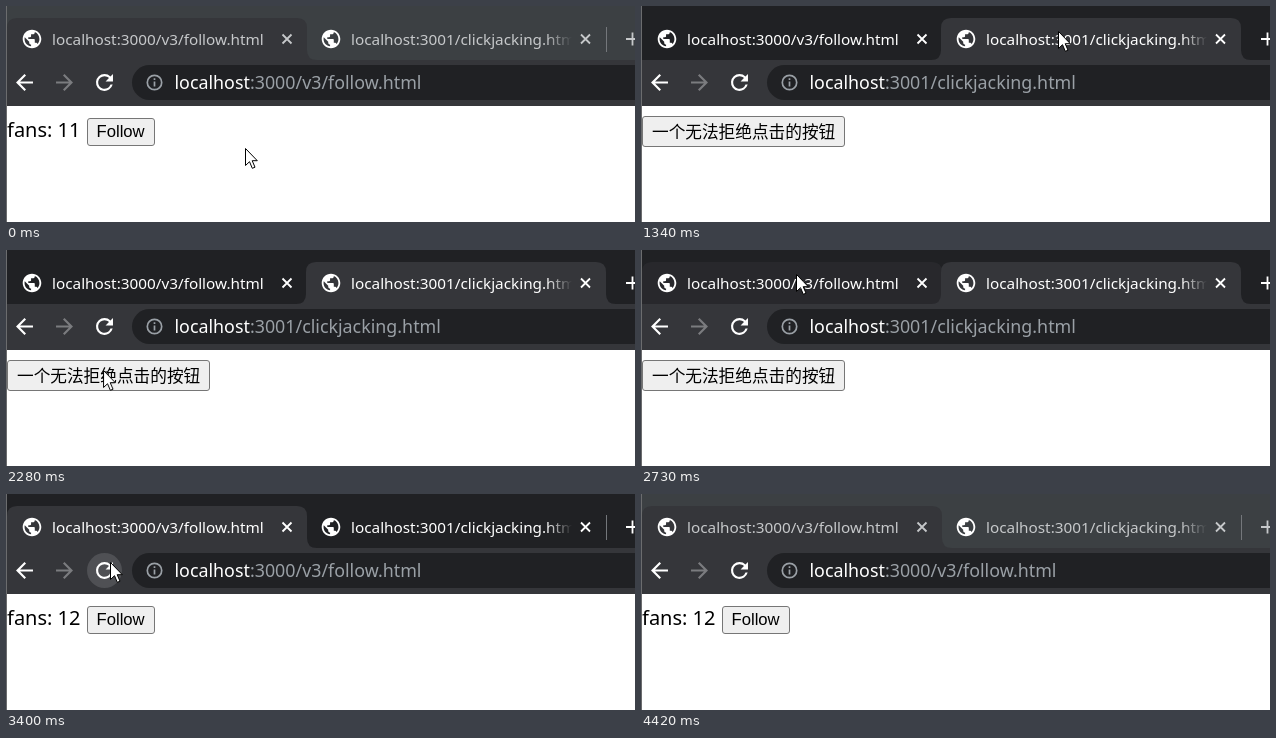
An HTML page for the animation above (4470 ms loop, 629 px wide and 216 px high).

```html
<!DOCTYPE html>
<html lang="zh">
<head>
<meta charset="utf-8">
<title>Clickjacking demo</title>
<style>
html, body { margin: 0; width: 100%; height: 100%; overflow: hidden; background: #fff; }
svg { display: block; width: 629px; height: 216px; }
text { font-family: "Noto Sans", "Open Sans", sans-serif; white-space: pre; }
.anim { animation: 4470ms infinite step-end; }

.tab-text { font-size: 15.3px; fill: currentColor; }
.url { font-size: 17.85px; fill: #9aa0a6; }
.host { fill: #fff; }
.fans { font-size: 20px; }
.button { fill: #efefef; stroke: #767676; }
.follow { font: 16.67px "Liberation Sans", Arial, sans-serif; }
.bait { font: 16.67px "Noto Sans CJK SC", "Noto Sans CJK", sans-serif; }
.line { fill: none; stroke: currentColor; stroke-width: 1.8; }

.chrome { animation-name: ink; }
.strip { animation-name: strip; }
.first { animation-name: first; }
.second { animation-name: second; }
.before { animation-name: before; }
.after { animation-name: after; }
.divider { animation-name: divider; }
.reload-hover { animation-name: reload-hover; }
.hover-1 { animation-name: hover-1; animation-timing-function: linear; }
.hover-2 { animation-name: hover-2; animation-timing-function: linear; }
.cursor { animation-name: cursor; animation-timing-function: linear; }

/* window focus */
@keyframes ink { 0%, 98.85% { color: #c6c8ca; } 29.95%, 100% { color: #fff; } }
@keyframes strip { 0%, 98.85% { fill: #3c4043; } 29.95%, 100% { fill: #202124; } }

/* selected tab */
@keyframes first { 0%, 63.05% { opacity: 1; } 29.95%, 63% { opacity: 0; } 100% { opacity: 1; } }
@keyframes second { 0%, 63.05% { opacity: 0; } 29.95%, 63% { opacity: 1; } 100% { opacity: 0; } }

/* fan counter */
@keyframes before { 0% { opacity: 1; } 75.9%, 100% { opacity: 0; } }
@keyframes after { 0% { opacity: 0; } 75.9%, 100% { opacity: 1; } }

@keyframes divider { 0%, 63.05% { opacity: 1; } 17%, 63% { opacity: 0; } 100% { opacity: 1; } }
@keyframes reload-hover { 0%, 87.2% { opacity: 0; } 69.1% { opacity: 1; } 100% { opacity: 0; } }
@keyframes hover-1 {
  0%, 57.5% { opacity: 0; }
  61%, 63% { opacity: .4; }
  63.05%, 100% { opacity: 0; }
}
@keyframes hover-2 {
  0%, 16.8% { opacity: 0; }
  19.2%, 29.9% { opacity: .7; }
  29.95%, 100% { opacity: 0; }
}

@keyframes cursor {
  0%, 4.1% { transform: translate(239px, 142px); }
  8% { transform: translate(285px, 178px); }
  12% { transform: translate(400px, 150px); }
  16.3% { transform: translate(469px, 39px); }
  19.2% { transform: translate(417px, 25px); }
  32% { transform: translate(417px, 25px); animation-timing-function: ease-in-out; }
  41.4% { transform: translate(93px, 122px); }
  42%, 50.4% { transform: translate(92px, 121px); }
  50.95% { transform: translate(97px, 120px); animation-timing-function: ease-in-out; }
  61% { transform: translate(155px, 24px); }
  63.1% { transform: translate(155px, 24px); animation-timing-function: ease-in-out; }
  70.4% { transform: translate(104px, 68px); }
  78.1% { transform: translate(104px, 68px); animation-timing-function: ease-in; }
  83.4%, 100% { transform: translate(460px, 217px); }
}
</style>
</head>
<body>
<svg viewBox="0 0 629 216">
  <defs>
    <path id="tab" d="M-9 54Q1 54 1 44V22Q1 12 11 12H291Q301 12 301 22V44Q301 54 311 54Z"/>
    <path id="globe" transform="scale(.93) translate(-12 -12)" d="M12 2C6.48 2 2 6.48 2 12s4.48 10 10 10 10-4.48 10-10S17.52 2 12 2zm-1 17.93c-3.95-.49-7-3.85-7-7.93 0-.62.08-1.21.21-1.79L9 15v1c0 1.1.9 2 2 2v1.93zm6.9-2.54c-.26-.81-1-1.39-1.9-1.39h-1v-3c0-.55-.45-1-1-1H8v-2h2c.55 0 1-.45 1-1V7h2c1.1 0 2-.9 2-2v-.41c2.93 1.19 5 4.06 5 7.41 0 2.08-.8 3.97-2.1 5.39z"/>
    <path id="arrow" transform="scale(1.06) translate(-12 -12)" d="M20 11H7.83l5.59-5.59L12 4l-8 8 8 8 1.41-1.41L7.83 13H20z"/>
    <path id="close" class="line" d="M-4.5 -4.5L4.5 4.5M4.5 -4.5L-4.5 4.5"/>
    <linearGradient id="fade" gradientUnits="userSpaceOnUse" x1="540" x2="566" y1="0" y2="0">
      <stop stop-color="#fff"/><stop offset="1" stop-color="#fff" stop-opacity="0"/>
    </linearGradient>
    <mask id="clip" maskUnits="userSpaceOnUse" x="340" y="12" width="226" height="42">
      <rect x="340" y="12" width="226" height="42" fill="url(#fade)"/>
    </mask>
  </defs>

  <rect width="629" height="216" fill="#fff"/>

  <g class="anim chrome">
    <rect class="anim strip" width="629" height="55"/>
    <g fill="#35363a">
      <use href="#tab" class="anim hover-1"/>
      <use href="#tab" x="299" class="anim hover-2"/>
      <use href="#tab" class="anim first"/>
      <use href="#tab" x="299" class="anim second"/>
      <rect y="54" width="629" height="46"/>
    </g>
    <path class="anim divider" d="M600.5 21V46" stroke="#74777b"/>
    <use href="#globe" x="26" y="33" fill="#fff"/>
    <use href="#globe" x="325" y="33" fill="#fff"/>
    <text class="tab-text" x="46" y="39">localhost:3000/v3/follow.html</text>
    <g mask="url(#clip)"><text class="tab-text" x="345" y="39">localhost:3001/clickjacking.html</text></g>
    <use href="#close" x="281" y="33"/>
    <use href="#close" x="579.5" y="33"/>
    <path class="line" d="M620 33H633M626.5 26.5V39.5"/>
  </g>

  <circle class="anim reload-hover" cx="98.5" cy="76.5" r="17.5" fill="#4f5054"/>
  <use href="#arrow" x="18.5" y="76.5" fill="#fff"/>
  <g transform="translate(58.5 76.5) scale(-1 1)"><use href="#arrow" fill="#7b7c7f"/></g>
  <path fill="#fff" transform="translate(98.5 76.5) scale(1.06) translate(-12 -12)" d="M17.65 6.35A7.96 7.96 0 0 0 12 4a8 8 0 1 0 7.73 10h-2.08A6 6 0 1 1 12 6c1.66 0 3.14.69 4.22 1.78L13 11h7V4z"/>
  <rect x="126" y="59" width="540" height="35" rx="17.5" fill="#202124"/>
  <g fill="none" stroke="#9aa0a6" stroke-width="1.7">
    <circle cx="148.5" cy="76.5" r="7.2"/>
    <path d="M148.5 75.5V80.5M148.5 72.3V74"/>
  </g>

  <g class="anim first">
    <text class="url" x="168.5" y="83"><tspan class="host">localhost</tspan>:3000/v3/follow.html</text>
    <text class="fans" x="1" y="131">fans: 1</text>
    <text class="fans anim before" x="63" y="131">1</text>
    <text class="fans anim after" x="63" y="131">2</text>
    <rect class="button" x="81.5" y="112.5" width="67" height="27" rx="2.5"/>
    <text class="follow" x="90.5" y="131">Follow</text>
  </g>
  <g class="anim second">
    <text class="url" x="168.5" y="83"><tspan class="host">localhost</tspan>:3001/clickjacking.html</text>
    <rect class="button" x="1.5" y="110.5" width="202" height="30" rx="2.5"/>
    <text class="bait" x="11" y="132">一个无法拒绝点击的按钮</text>
  </g>

  <rect width="1" height="216" fill="#6b6c6e"/>
  <path class="anim cursor" d="M.5 .5V17.5L4.5 13.7 7.3 20.3 10 19.2 7.2 12.7H12.3Z" fill="#fff" stroke="#000"/>
</svg>
</body>
</html>
```
